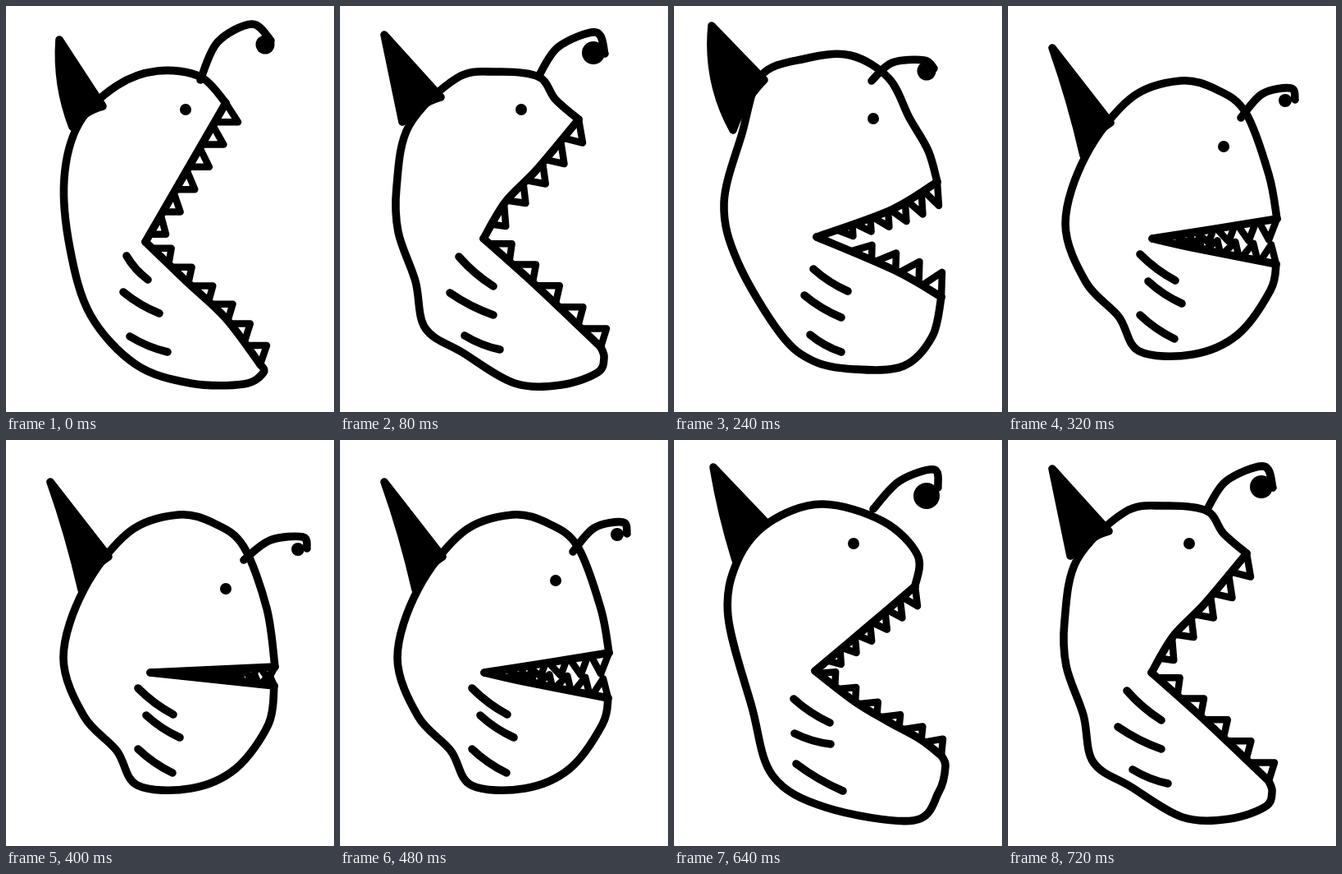
An HTML page that plays this animation: 400x494 px, repeating every 800 ms.

```html
<!DOCTYPE html>
<html lang="en">
<head>
<meta charset="utf-8">
<title>Chomping fish</title>
<style>
  html, body { margin: 0; width: 100%; height: 100%; overflow: hidden; background: #fff; }
  svg { display: block; width: 100vw; height: 100vh; }
  path { fill: none; stroke: #000; stroke-width: 9.6; stroke-linecap: round; stroke-linejoin: round; }
  .tooth { stroke-width: 8.5; }
  .horn { fill: #000; }
</style>
</head>
<body>
<svg id="stage" viewBox="0 0 400 494" preserveAspectRatio="none"></svg>
<script>
const STEP = 80;

// A jaw runs from the hinge to its tip; teeth lean by reach and start at a share of its length.
const jaw = (line, teeth, from, reach) => ({ line, teeth, from, reach });

// Key points of each pose, from wide open to shut. The horn is tip, foot, shoulder.
const poses = [
  {
    body: "237,86 185,79 135,97 89,143 71,210 78,295 103,376 158,436 225,459 290,460 314,446",
    upper: jaw("170,287 268,118", 6, 0.03, [15, 0]),
    lower: jaw("170,287 220,335 268,380 310,436", 6, 0.03, [8, 0]),
    horn: "65,41 81,147 118,122", bulge: 6,
    feeler: "237,90 258,44 300,22 323,42", ball: [316, 47, 11.5],
    eye: [219, 126],
    gills: ["147,304 173,333", "143,348 187,374", "151,402 197,421"]
  },
  {
    body: "263,114 242,86 190,80 142,88 84,146 69,220 71,275 92,335 104,392 150,422 213,459 270,461 314,446 322,428",
    upper: jaw("175,283 202,238 240,199 291,138", 5, 0.08, [5, 6]),
    lower: jaw("175,283 240,341 318,415", 5, 0.02, [7, 0]),
    horn: "54,35 76,141 123,111", bulge: 0,
    feeler: "242,86 266,50 312,32 323,58", ball: [309, 57, 14],
    eye: [221, 126],
    gills: ["145,305 187,341", "134,349 187,376", "152,401 195,418"]
  },
  {
    body: "297,140 255,99 180,78 115,101 77,148 66,215 95,325 120,408 185,447 292,463 323,428 331,397",
    upper: jaw("172,281 235,228 294,178", 6, 0.1, [3, 11]),
    lower: jaw("172,281 220,318 260,342 300,364 326,384", 6, 0, [2, -4]),
    horn: "48,33 75,146 112,100", bulge: 2,
    feeler: "243,84 275,50 317,36 322,58", ball: [308, 68, 16],
    eye: [219, 126],
    gills: ["146,315 190,344", "147,357 191,370", "149,394 206,427"]
  },
  {
    body: "310,176 287,136 262,88 215,60 160,64 106,85 83,155 61,240 78,312 130,399 170,432 220,442 280,438 315,402",
    upper: jaw("174,281 265,248 321,214", 6, 0.14, [2, 18]),
    lower: jaw("174,281 270,322 326,354", 4, 0.24, [1, -16]),
    horn: "46,24 72,151 110,90", bulge: 10,
    feeler: "241,91 266,69 305,66 317,76", ball: [308, 79, 11.5],
    eye: [243, 137],
    gills: ["170,320 212,347", "159,352 204,379", "166,400 204,421"]
  },
  {
    body: "318,205 290,130 255,102 210,91 150,112 95,182 70,265 95,336 135,378 160,420 225,424 280,400 320,346",
    upper: jaw("176,283 260,270 328,259", 5, 0.15, [-10, 22]),
    lower: jaw("176,283 220,293 327,314", 5, 0.25, [-6, -20]),
    horn: "54,51 92,182 125,142", bulge: -2,
    feeler: "284,136 310,107 345,100 350,114", ball: [338, 115, 8],
    eye: [263, 171],
    gills: ["161,302 204,334", "171,335 212,362", "161,376 203,405"]
  }
];
poses.push({
  ...poses[4],
  upper: jaw("176,283 328,276", 6, 0.15, [-8, 14]),
  lower: jaw("176,283 327,299", 6, 0.25, [-6, -12]),
  feeler: "290,146 322,122 362,118 367,132", ball: [356, 133, 8],
  eye: [268, 181]
});

const NS = "http://www.w3.org/2000/svg";
const stage = document.getElementById("stage");
const parse = text => text.split(" ").map(pair => pair.split(",").map(Number));

// Catmull-Rom curve through the points
function smooth(pts) {
  const at = i => pts[Math.max(0, Math.min(pts.length - 1, i))];
  let d = "M" + pts[0];
  for (let i = 0; i < pts.length - 1; i++) {
    const [a, b, c, e] = [-1, 0, 1, 2].map(k => at(i + k));
    const c1 = b.map((v, k) => v + (c[k] - a[k]) / 6);
    const c2 = c.map((v, k) => v - (e[k] - b[k]) / 6);
    d += `C${c1} ${c2} ${c}`;
  }
  return d;
}

// Quadratic segment to b, bowed sideways from the chord
function bow(a, b, bend) {
  const [dx, dy] = [b[0] - a[0], b[1] - a[1]];
  const k = 2 * bend / Math.hypot(dx, dy);
  return `Q${(a[0] + b[0]) / 2 - dy * k},${(a[1] + b[1]) / 2 + dx * k} ${b}`;
}

function add(tag, parent, attrs) {
  const el = parent.appendChild(document.createElementNS(NS, tag));
  for (const key in attrs) el.setAttribute(key, attrs[key]);
  return el;
}

function drawJaw(g, { line, teeth, from, reach }) {
  const path = add("path", g, { d: smooth(parse(line)) });
  const length = path.getTotalLength();
  const point = n => path.getPointAtLength(length * (from + (1 - from) * n / teeth));
  for (let i = 0; i < teeth; i++) {
    const inner = point(i + 0.15), outer = point(i + 1);
    const grow = 0.3 + 0.7 * (i + 1) / teeth;
    const x = outer.x + reach[0] * grow, y = inner.y + reach[1] * grow;
    add("path", g, { class: "tooth", d: `M${inner.x},${inner.y}L${x},${y}L${outer.x},${outer.y}` });
  }
}

function build(pose) {
  const g = add("g", stage, { visibility: "hidden" });
  const curve = pts => add("path", g, { d: smooth(pts) });
  const dot = ([cx, cy, r = 7]) => add("circle", g, { cx, cy, r });

  const [top, bottom] = [pose.upper, pose.lower].map(j => parse(j.line).pop());
  curve([top, ...parse(pose.body), bottom]);
  drawJaw(g, pose.upper);
  drawJaw(g, pose.lower);

  const [tip, foot, shoulder] = parse(pose.horn);
  add("path", g, { class: "horn", d: `M${tip}${bow(tip, foot, pose.bulge)}${bow(foot, shoulder, -4)}Z` });

  curve(parse(pose.feeler));
  dot(pose.ball);
  dot(pose.eye);
  for (const gill of pose.gills) {
    const [a, b] = parse(gill);
    add("path", g, { d: `M${a}${bow(a, b, 2)}` });
  }
  return g;
}

const groups = poses.map(build);
const last = groups.length - 1;
const start = performance.now();

// Step through the poses and back again
function draw(ms) {
  const step = Math.floor(ms / STEP) % (2 * last);
  const shown = last - Math.abs(last - step);
  groups.forEach((g, i) => g.setAttribute("visibility", i === shown ? "visible" : "hidden"));
}

function tick() {
  draw(performance.now() - start);
  requestAnimationFrame(tick);
}

draw(0);
requestAnimationFrame(tick);
</script>
</body>
</html>
```
